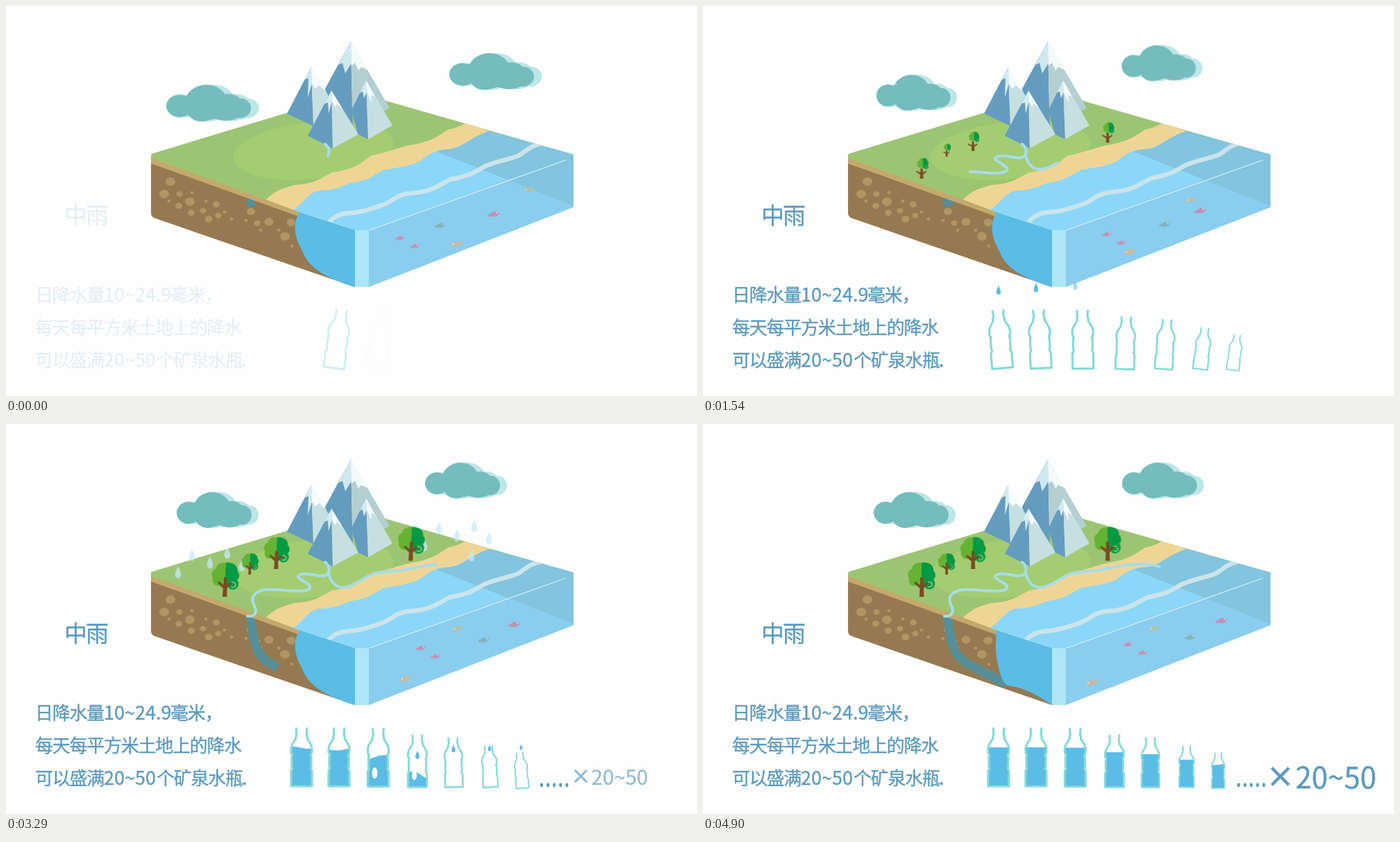
Recreate the animation shown at these times as an HTML page. Size 996x562 px, loop 4970 ms.

```html
<!DOCTYPE html>
<html lang="zh">
<head>
<meta charset="utf-8">
<title>中雨</title>
<style>
html, body { margin: 0; width: 100%; height: 100%; overflow: hidden; background: #fffefe; }
svg { display: block; width: 100vw; height: 100vh; }
.a { animation: 4970ms linear infinite; }

text, .ink { fill: #5b9abe; }
text { font: 26px "Noto Sans CJK SC", "Noto Sans CJK", sans-serif; letter-spacing: -1.25px; stroke: #5b9abe; stroke-width: .35; }
.n { font-size: 27px; letter-spacing: 0; }
.title { font-size: 33px; letter-spacing: -2px; }
.big { font-size: 42px; letter-spacing: 0; }
.times { font: 48px "DejaVu Sans", sans-serif; }

.copy { animation-name: copy; }
@keyframes copy { 0% { opacity: .15 } 9.9% { opacity: .35 } 22.5% { opacity: .86 } 30%, 100% { opacity: 1 } }

.count { transform-origin: 820px 508px; animation-name: count; }
@keyframes count {
  0%, 62% { transform: scale(0); opacity: 0 }
  67.6% { transform: scale(.93); opacity: .9 }
  70.5% { transform: scale(1.137); opacity: 1 }
  74.5%, 100% { transform: none; opacity: 1 }
}

.cloudL { animation-name: cloudL; }
.cloudR { animation-name: cloudR; }
@keyframes cloudL {
  0% { transform: translate(-8px, 16px) scale(1.13, 1.02) }
  3% { transform: translate(-9px, 8px) scale(1.11, 1.03) }
  9.9% { transform: translate(-2px, -7px) scale(1.03, 1.04) }
  14% { transform: translate(6px, -13px) scale(.98, 1.02) }
  22.5% { transform: translate(17px, 5px) scale(.935, .98) }
  33%, 100% { transform: none }
}
@keyframes cloudR {
  0% { transform: translate(42px, 13px) scale(1.13, 1.02) }
  9.9% { transform: translate(10px, -10px) scale(1.03, 1.04) }
  14% { transform: translate(2px, -17px) scale(.98, 1.02) }
  22.5% { transform: translate(-6px, 5px) scale(.935, .98) }
  33%, 100% { transform: none }
}

.rain { fill: #c8e8f9; animation-name: rain; }
@keyframes rain {
  0%, 34% { transform: translateY(-7px); opacity: 0 }
  40.8% { transform: none; opacity: .75 }
  48% { opacity: .95 }
  56.3% { transform: translateY(16.5px); opacity: .95 }
  76% { transform: translateY(34.5px); opacity: .55 }
  88%, 100% { transform: translateY(46px); opacity: 0 }
}

.flow { fill: none; stroke: #a6dcea; stroke-width: 4; stroke-linecap: round; stroke-dasharray: 100 200; }
.west { animation-name: west; }
.east { animation-name: east; }
.under { stroke: #568f97; stroke-width: 13; stroke-linecap: butt; animation-name: under; }
@keyframes west {
  0% { stroke-dashoffset: 91 } 9.9% { stroke-dashoffset: 72 } 22.5% { stroke-dashoffset: 49 }
  40.8% { stroke-dashoffset: 14 } 50%, 100% { stroke-dashoffset: 0 }
}
@keyframes east {
  0%, 14% { stroke-dashoffset: 101 } 22.5% { stroke-dashoffset: 85 } 40.8% { stroke-dashoffset: 57 }
  56.3% { stroke-dashoffset: 32 } 76% { stroke-dashoffset: 4 } 80%, 100% { stroke-dashoffset: 0 }
}
@keyframes under {
  0%, 48% { stroke-dashoffset: 91 } 56.3% { stroke-dashoffset: 77 } 75%, 100% { stroke-dashoffset: 0 }
}

.foam { animation-name: foam; }
@keyframes foam {
  0% { transform: none } 9.9% { transform: translate(-3px, 1px) } 22.5% { transform: translate(7px, -2px) }
  40.8% { transform: translate(3px, -1px) } 56.3% { transform: translate(2px, -1px) }
  76% { transform: translate(-4px, 1px) } 98.6%, 100% { transform: none }
}
.bulge { animation-name: bulge; }
@keyframes bulge {
  0%, 84% { d: path("M423 297C411 318 418 336 427 353C434 372 452 390 503 405V323Z") }
  98%, 100% { d: path("M423 297C422 312 421 328 424 341C428 364 434 376 440 377C462 380 478 388 503 405V323Z") }
}

.sway { animation-name: sway; }
.trunk { animation-name: trunk; }
.leaf { transform-origin: 3px -16px; animation-name: leaf; }
@keyframes sway {
  0%, 32% { transform: none } 40.8% { transform: rotate(7deg) } 56.3% { transform: rotate(-8deg) }
  67% { transform: rotate(3deg) } 75%, 100% { transform: none }
}
@keyframes trunk {
  0%, 17% { transform: scale(0) } 22.5% { transform: scale(.7, .25) }
  40.8% { transform: scale(.85) } 50%, 100% { transform: none }
}
@keyframes leaf {
  0%, 21% { transform: scale(0) } 22.5% { transform: scale(.05) }
  40.8% { transform: scale(.83) } 50%, 100% { transform: none }
}

.swim { animation-name: swim; }
.swimBlue { animation-name: swimBlue; }
.swimLow { animation-name: swimLow; }
.swimHigh { animation-name: swimHigh; }
@keyframes swim { to { transform: translate(45px, -17px) } }
@keyframes swimBlue { 40.8% { transform: translate(52px, -2px) } 100% { transform: translate(77px, -9px) } }
@keyframes swimLow { 76% { transform: translate(-85px, 28px) } 100% { transform: translate(-90px, 30px) } }
@keyframes swimHigh { 63%, 100% { transform: translate(-103px, 30px) } }
</style>
</head>
<body>
<svg viewBox="0 0 996 562" preserveAspectRatio="none">
  <defs>
    <path id="drop" d="M0-7C1-3 3.2-1 3.2 2.8A3.2 3.6 0 0 1-3.2 2.8C-3.2-1-1-3 0-7Z"/>
    <g id="puff">
      <ellipse cx="-37" cy="4" rx="17" ry="16"/><ellipse cx="-3" cy="-1" rx="27" ry="25"/>
      <ellipse cx="25" cy="4" rx="19" ry="17"/><ellipse cx="40" cy="7" rx="14" ry="14"/>
      <ellipse cx="-9" cy="11" rx="18" ry="15"/><ellipse cx="22" cy="13" rx="20" ry="12"/>
    </g>
    <g id="cloud"><use href="#puff" x="10" fill="#bde6e6"/><use href="#puff" fill="#74bcbd"/></g>
    <g id="fish"><ellipse rx="7" ry="3.8"/><path d="M-5 0L-10-3L-9 3Z"/><circle cx="4" cy="-1" r="1.3" fill="#e6eef2" opacity=".8"/></g>
    <clipPath id="sea"><path d="M413 293L697 180L818 214L523 323H503Z"/></clipPath>
    <clipPath id="inside"><path id="inner"/></clipPath>
  </defs>

  <!-- land -->
  <path fill="#9cc573" d="M209 215Q209 213 213 212L504 124L818 214L523 323L423 297L209 220Z"/>
  <ellipse cx="443" cy="208" rx="116" ry="41" fill="#a4cd71" transform="rotate(-6 443 208)"/>
  <path fill="#957a51" d="M209 224L423 302L503 323V405L215 306Q209 304 209 298Z"/>
  <g id="stones" fill="#af9662"></g>
  <path class="a flow under" pathLength="100" d="M353 276C355 302 358 330 376 342C395 354 415 362 436 375"/>
  <path fill="#c4a96b" d="M209 219L375 279L424 296V304L209 227Z"/>
  <path fill="#efd595" d="M375 279C390 264 400 263 415 258C445 256 450 250 470 240C505 234 510 228 525 216C555 209 560 206 580 201C610 196 620 190 637 178C650 176 655 172 662 169L697 180L700 240L423 297Z"/>

  <!-- sea -->
  <path fill="#8bd7f9" d="M414 294C432 281 436 268 452 266C475 265 478 262 497 255C520 252 525 247 545 236C570 232 577 232 596 224C615 209 622 207 640 206C660 202 668 190 697 180L818 214L523 323H503L423 297Z"/>
  <path fill="#8acdee" d="M523 323L818 214V290L523 405Z"/>
  <path fill="#83c4de" d="M621 210C630 205 645 208 655 202C668 195 676 187 697 180L818 214V288Z"/>
  <path class="a bulge" fill="#5bbce6" d="M423 297C411 318 418 336 427 353C434 372 452 390 503 405V323Z"/>
  <path fill="#ade6f7" d="M503 323H523V405H503Z"/>
  <path stroke="#d5f0fa" stroke-width="1.2" d="M524 323L807 222"/>
  <g clip-path="url(#sea)">
    <path class="a foam" fill="none" stroke="#cbe4ea" stroke-width="6.5" d="M458 320C468 308 474 301 490 299C512 297 518 295 536 289C560 283 556 274 580 270C612 268 618 262 640 250C668 244 670 243 690 231C712 222 722 222 738 216C752 209 750 201 784 196"/>
  </g>
  <g id="shoal"></g>

  <!-- mountains -->
  <path fill="#649cc0" d="M497 51L452 134L470 150L500 180Z"/>
  <path fill="#b4cfd1" d="M497 51L553 147L508 170L499 150Z"/>
  <path fill="#cfe8f0" d="M497 51L479 85L485 82L489 97L498 82Z"/>
  <path fill="#f2fafc" d="M497 51L521 92L512 88L508 93L503 82L498 86Z"/>
  <path fill="#649cc0" d="M440 88L405 155L443 173Z"/>
  <path fill="#c6dfe1" d="M440 88L470 138L460 165L443 173Z"/>
  <path fill="#d3ebf2" d="M440 88L431 106L436 104L435 132L441 112Z"/>
  <path fill="#f5fbfd" d="M440 88L462 124L451 114L446 119L441 112Z"/>
  <path fill="#649cc0" d="M519 107L498 150L507 185L522 192Z"/>
  <path fill="#c6dfe1" d="M519 107L557 172L522 192Z"/>
  <path fill="#d3ebf2" d="M519 107L510 125L514 123L516 133L520 124Z"/>
  <path fill="#f5fbfd" d="M519 107L532 131L526 128L527 139L520 124Z"/>
  <path fill="#649cc0" d="M469 122L435 187L471 205Z"/>
  <path fill="#c6dfe1" d="M469 122L508 185L471 205Z"/>
  <path fill="#d3ebf2" d="M469 122L459 141L464 139L465 155L470 137Z"/>
  <path fill="#f5fbfd" d="M469 122L485 148L477 141L474 146L470 137Z"/>

  <path class="a flow west" pathLength="100" d="M460 199C466 204 467 210 464 216C455 224 436 212 424 217C412 223 442 228 438 237C428 246 388 236 372 239C356 243 352 250 358 262C362 270 360 278 348 277"/>
  <path class="a flow east" pathLength="100" d="M465 215C468 228 476 237 490 235C508 232 520 214 545 213C575 213 595 203 625 202C640 201 650 203 658 206"/>

  <g transform="translate(300 124)"><use href="#cloud" class="a cloudL"/></g>
  <g transform="translate(658 81.5)"><use href="#cloud" class="a cloudR"/></g>
  <g id="rain" class="a rain"></g>
  <g id="trees"></g>

  <!-- copy -->
  <g class="a copy">
    <text class="title" x="84" y="313.5">中雨</text>
    <text x="42" y="425.5">日降水量<tspan class="n" x="141">10~24.9</tspan><tspan x="237">毫米，</tspan></text>
    <text x="42" y="472.5">每天每平方米土地上的降水</text>
    <text x="42" y="519.5">可以盛满<tspan class="n" x="141">20~50</tspan><tspan x="217">个矿泉水瓶</tspan><tspan class="n" x="340">.</tspan></text>
  </g>
  <g id="bottles"></g>
  <g id="dots" class="ink"></g>
  <g class="a count">
    <text class="times" x="812" y="523">×</text>
    <text class="big" x="854" y="525">20~50</text>
  </g>
</svg>
<script>
const LOOP = 4970;
const $ = id => document.getElementById(id);

function add(parent, tag, attrs = {}) {
  const el = document.createElementNS('http://www.w3.org/2000/svg', tag);
  for (const k in attrs) el.setAttribute(k, attrs[k]);
  return parent.appendChild(el);
}

// Piecewise linear value of a [time, value] track.
function track(keys, t) {
  if (t <= keys[0][0]) return keys[0][1];
  for (let i = 1; i < keys.length; i++) {
    const [a, x] = keys[i - 1], [b, y] = keys[i];
    if (t < b) return x + (y - x) * (t - a) / (b - a);
  }
  return keys[keys.length - 1][1];
}

[[237, 253, 7], [228, 271, 7], [250, 271, 4.5], [268, 269, 2.5], [265, 282, 7], [249, 288, 5],
 [235, 281, 2.5], [288, 281, 2.5], [303, 286, 5], [267, 298, 5], [284, 295, 4.5], [292, 307, 5.5],
 [306, 302, 4.5], [315, 297, 2.5], [325, 307, 2.5], [353, 296, 6], [346, 309, 2.5], [362, 313, 4.5],
 [367, 323, 2.5], [379, 311, 6.5], [393, 323, 2.5], [402, 332, 7], [411, 312, 6.5], [412, 346, 2.5]]
  .forEach(([cx, cy, rx]) => add($('stones'), 'ellipse', { cx, cy, rx, ry: rx * .88 }));

[[569, 334, .75, '#c48fb4', 'swim'], [590, 346, .75, '#c48fb4', 'swim'], [704, 300, .95, '#c090b4', 'swim'],
 [627, 316, .9, '#7fb5bb', 'swimBlue'], [649, 343, -1, '#c9b9a0', 'swimLow'], [753, 265, -.9, '#b5c0a6', 'swimHigh']]
  .forEach(([x, y, s, fill, name]) => {
    const g = add($('shoal'), 'g', { class: 'a ' + name });
    add(g, 'use', { href: '#fish', fill, transform: `translate(${x} ${y}) rotate(-14) scale(${s} ${Math.abs(s)})` });
  });

const shower = [[0, 27], [20, 2], [46, 13], [71, -1], [92, 17], [67, 42]];
[[248, 161], [603, 122]].forEach(([x, y], side) => shower.forEach(([dx, dy]) => {
  const fromLeft = side && dx === 0 ? 0 : dx + side;
  add($('rain'), 'use', { href: '#drop', transform: `translate(${x + fromLeft} ${y + dy}) scale(1.35)` });
}));

[[315, 249, 1], [351, 217, .62], [389, 209, .93], [583, 197, .98]].forEach(([x, y, s]) => {
  const place = add($('trees'), 'g', { transform: `translate(${x} ${y}) scale(${s})` });
  const tree = add(place, 'g', { class: 'a sway' });
  const leaf = add(tree, 'g', { class: 'a leaf' });
  add(leaf, 'path', { fill: '#65b234', d: 'M0-49C-8-50-14-45-14-40C-20-38-21-30-18-27C-20-20-14-14-8-16Q-4-13 0-16Z' });
  add(leaf, 'path', { fill: '#009a44', d: 'M0-49C10-51 18-45 17-38C22-33 20-26 17-25C23-19 17-9 9-11Q5-12 5-16H0Z' });
  add(leaf, 'path', { fill: 'none', stroke: '#9cc573', 'stroke-width': 1.6, d: 'M7-20C13-24 18-18 14-15Q11-13 9-15' });
  add(tree, 'path', {
    class: 'a trunk', fill: '#7b4a21',
    d: 'M-3 0L-2.5-12L-11-20L-9-22L-2-17V-28H2.5V-17L8-22L10-20L3-12L3.5 0Z'
  });
});

const dots = [0, 1, 2, 3, 4].map(i => add($('dots'), 'ellipse', { cx: 772 + 9.1 * i, cy: 520.3, rx: 2, ry: 3 }));

const outline = 'M-8-43L-7-33Q-9-31-8-28C-10-22-15-20-15-12V-7Q-12-4-14-1V13Q-12 16-15 19V41.5H15V19Q12 16 14 13V-1Q12-4 15-7V-12C15-20 10-22 8-28Q9-31 7-33L8-43';
$('inner').setAttribute('d', outline);

const bottles = [[426, 480.5, 1], [480, 480.5, 1], [536.5, 481, 1], [593, 486, .9], [645, 488, .85], [697, 494, .71], [742.5, 499.5, .61]]
  .map(([x, y, s], i) => {
    const body = add($('bottles'), 'g');
    const fill = add(body, 'g', { 'clip-path': 'url(#inside)' });
    const water = add(fill, 'path', { fill: '#5bbce6' });
    const bubble = add(fill, 'ellipse', { rx: 4, fill: '#fffefe' });
    add(body, 'path', { d: outline, fill: 'none', stroke: '#87dad7', 'stroke-width': 3.2, 'stroke-linejoin': 'round' });
    const drop = add($('bottles'), 'use', { href: '#drop', fill: '#5bbce6' });
    return { x, y, s, body, water, bubble, drop, enter: 200 * i - 220, pour: 1230 + 200 * i };
  });

const slide = [[0, 60], [1320, 12], [1650, 3], [2250, 0]];
const tilt = [[0, 8], [700, 7.5], [1300, 0], [1900, -6], [2250, -5.5], [2850, 0]];
const fall = [[-150, -36], [0, -33], [600, -23], [800, -18], [970, -1], [1170, 13], [1370, 28], [1560, 39], [1700, 46]];
const level = [[1260, 44], [1350, 35], [1550, 12], [1750, -11], [2100, -14.5]];
const swell = [[1260, 3], [1370, 8], [1570, 4], [1800, 2], [2500, 1.2], [2700, 0]];
const show = [[-200, 0], [0, 1], [1600, 1], [1680, 0]];

function surface(u) {
  const mid = track(level, u), amp = track(swell, u);
  let d = 'M-17 50';
  for (let x = -17; x <= 17; x += 2) d += `L${x} ${(mid + amp * Math.sin(x / 9 - u / 110)).toFixed(2)}`;
  return d + 'L17 50Z';
}

function drawBottle(b, t) {
  const v = t - b.enter, u = t - b.pour;
  b.body.setAttribute('transform', `translate(${b.x + track(slide, v) * b.s} ${b.y}) rotate(${track(tilt, v)}) scale(${b.s})`);
  b.body.setAttribute('opacity', Math.min(1, Math.max(0, v / 600)));
  b.water.setAttribute('d', surface(u));
  const early = u > 1430 && u < 1670, late = u > 2260 && u < 2440;
  b.bubble.setAttribute('cx', early ? -5 : 0);
  b.bubble.setAttribute('cy', early ? 22 : 30);
  b.bubble.setAttribute('ry', early ? 8 : 10);
  b.bubble.setAttribute('opacity', early || late ? 1 : 0);
  b.drop.setAttribute('transform', `translate(${b.x} ${b.y + (track(fall, u) - 43.5) * b.s}) scale(${b.s})`);
  b.drop.setAttribute('opacity', track(show, u));
}

let start;
function frame(now) {
  start ??= now;
  const t = (now - start) % LOOP;
  bottles.forEach(b => drawBottle(b, t));
  dots.forEach((d, i) => d.setAttribute('opacity', t > 1690 + 70 * i ? 1 : 0));
  requestAnimationFrame(frame);
}
requestAnimationFrame(frame);
</script>
</body>
</html>
```
